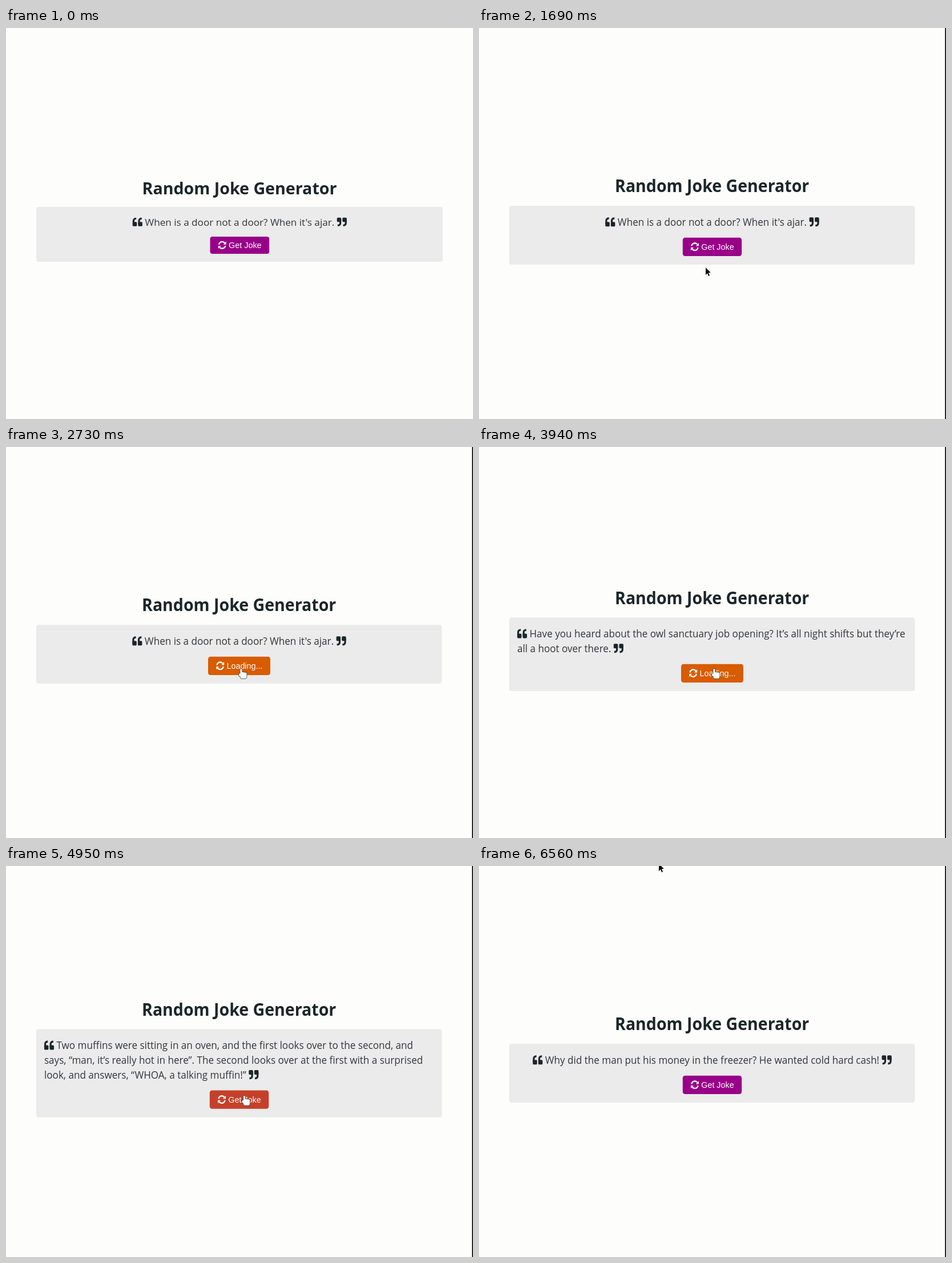
Animation of 818 by 684 pixels, one loop 6650 ms. Source, as an HTML page with a canvas:

```html
<!DOCTYPE html>
<html lang="en">
<head>
<meta charset="utf-8">
<title>Random Joke Generator</title>
<style>
  html, body { margin: 0; width: 100%; height: 100%; overflow: hidden; background: #000; }
  canvas { display: block; }
</style>
</head>
<body>
<canvas id="stage" width="818" height="684"></canvas>
<script>
const ctx = document.getElementById('stage').getContext('2d');
const LOOP = 6650, W = 818, H = 684, CENTER = 409.3;
const ZOOM_X = 0.998, ZOOM_Y = 1.073, ZOOM_TOP = -24.8;
const LINE = 24, BUTTON_TOP = 365, BUTTON_HEIGHT = 30;
const FADE = 200, STEP = 10, POINTER_LAG = 20;
const TITLE_FONT = '700 28.6px "Open Sans", sans-serif';
const JOKE_FONT = '17.12px "Open Sans", sans-serif';
const BUTTON_FONT = '14.4px "Liberation Sans", Arial, sans-serif';
const PURPLE = [153, 0, 136], ORANGE = [216, 92, 0];
const INK = '#1b2628';

// Each joke appears at `start`, after a click that shows the loading label.
const jokes = [
  { click: 0, start: 0, lines: ["When is a door not a door? When it's ajar."] },
  { click: 2730, start: 3110, lines: [
    'Have you heard about the owl sanctuary job opening? It’s all night shifts but they’re',
    'all a hoot over there.'] },
  { click: 3940, start: 4270, lines: [
    'Two muffins were sitting in an oven, and the first looks over to the second, and',
    'says, “man, it’s really hot in here”. The second looks over at the first with a surprised',
    'look, and answers, “WHOA, a talking muffin!”'] },
  { click: 5340, start: 5650, lines: [
    'Why did the man put his money in the freezer? He wanted cold hard cash!'] },
];

// The pointer rests between these moves.
const entry = { start: 480, x: 722, y: 389 };
const moves = [
  { start: 480, end: 790, x: 578, y: 165 },
  { start: 960, end: 1590, x: 397, y: 419 },
  { start: 1690, end: 2340, x: 412, y: 388 },
  { start: 4710, end: 5000, x: 418, y: 403 },
  { start: 5650, end: 6100, x: 335, y: 87 },
  { start: 6330, end: 6560, x: 315, y: -4 },
];

const clamp = v => Math.max(0, Math.min(1, v));
const mix = (a, b, k) => a + (b - a) * k;
const smooth = k => k * k * (3 - 2 * k);
const jokeAt = t => jokes.findLast(joke => t >= joke.start);
const extraHeight = t => (jokeAt(t).lines.length - 1) * LINE / 2;

function pointerAt(t) {
  let { x, y } = entry;
  for (const move of moves) {
    const k = smooth(clamp((t - move.start) / (move.end - move.start)));
    x = mix(x, move.x, k);
    y = mix(y, move.y, k);
  }
  return { x, y };
}

function overButton(t) {
  const { x, y } = pointerAt(t);
  const pageY = (y - ZOOM_TOP) / ZOOM_Y - BUTTON_TOP - extraHeight(t);
  return Math.abs(x / ZOOM_X - CENTER) < 52 && pageY > 0 && pageY < BUTTON_HEIGHT;
}

// Replays the fade up to time t, so the colour depends on the time alone.
function hoverAmount(t) {
  let amount = 0;
  for (let time = entry.start; time < t; time += STEP) {
    amount = clamp(amount + (overButton(time) ? STEP : -STEP) / FADE);
  }
  return amount;
}

function place(x, y, scale, draw) {
  ctx.save();
  ctx.translate(x, y);
  ctx.scale(scale, scale);
  draw();
  ctx.restore();
}

// Icons are drawn on a 512 unit grid.
function halfTurn() {
  ctx.translate(512, 512);
  ctx.rotate(Math.PI);
}

function quoteMark() {
  ctx.beginPath();
  ctx.roundRect(0, 256, 224, 224, 48);
  ctx.fill();
  ctx.lineWidth = 96;
  ctx.beginPath();
  ctx.moveTo(48, 370);
  ctx.arc(160, 192, 112, Math.PI, 1.5 * Math.PI);
  ctx.lineTo(190, 80);
  ctx.stroke();
}

function quoteIcon(x, baseline, closing) {
  place(x, baseline - 15, 17.12 / 512, () => {
    ctx.fillStyle = ctx.strokeStyle = INK;
    if (closing) halfTurn();
    quoteMark();
    ctx.translate(288, 0);
    quoteMark();
  });
}

function syncArrow() {
  ctx.lineWidth = 80;
  ctx.beginPath();
  ctx.arc(256, 256, 208, 1.06 * Math.PI, 1.77 * Math.PI);
  ctx.stroke();
  ctx.beginPath();
  ctx.moveTo(504, 36);
  ctx.lineTo(504, 216);
  ctx.lineTo(324, 216);
  ctx.fill();
}

function syncIcon(x, y) {
  place(x, y, 14.4 / 512, () => {
    syncArrow();
    halfTurn();
    syncArrow();
  });
}

function roundRect(x, y, w, h, color) {
  ctx.fillStyle = color;
  ctx.beginPath();
  ctx.roundRect(x, y, w, h, 4);
  ctx.fill();
}

function drawJoke(lines, firstBaseline) {
  ctx.font = JOKE_FONT;
  const widthOf = text => ctx.measureText(text).width;
  const space = widthOf(' '), indent = 17.12 + space;
  const left = lines.length > 1 ? 67.1 : CENTER - widthOf(lines[0]) / 2 - indent;
  quoteIcon(left, firstBaseline, false);
  ctx.fillStyle = '#333537';
  lines.forEach((line, i) => {
    const x = i ? left : left + indent, baseline = firstBaseline + i * LINE;
    ctx.fillText(line, x, baseline);
    if (i === lines.length - 1) quoteIcon(x + widthOf(line) + space, baseline, true);
  });
}

function drawButton(t, top) {
  const loading = jokes.some(joke => t >= joke.click && t < joke.start);
  const label = loading ? 'Loading...' : 'Get Joke';
  const hover = hoverAmount(t);
  const color = PURPLE.map((c, i) => Math.round(mix(c, ORANGE[i], hover)));
  ctx.font = BUTTON_FONT;
  const width = ctx.measureText(label).width + 46;
  const left = CENTER - width / 2;
  roundRect(left, top, width, BUTTON_HEIGHT, `rgb(${color})`);
  ctx.fillStyle = ctx.strokeStyle = '#fdfdfd';
  syncIcon(left + 14, top + 7.6);
  ctx.fillText(label, left + 32.5, top + 20);
}

function drawPage(t) {
  const extra = extraHeight(t);
  const zoom = clamp((t - 60) / 190);
  ctx.save();
  ctx.translate(0, mix(0, ZOOM_TOP, zoom));
  ctx.scale(mix(1, ZOOM_X, zoom), mix(1, ZOOM_Y, zoom));
  ctx.fillStyle = '#fdfdfc';
  ctx.fillRect(0, 0, W, H);
  ctx.fillStyle = INK;
  ctx.font = TITLE_FONT;
  ctx.textAlign = 'center';
  ctx.fillText('Random Joke Generator', CENTER - 0.3, 291 - extra);
  ctx.textAlign = 'left';
  roundRect(53, 313 - extra, 712, 96 + 2 * extra, '#ebebec');
  drawJoke(jokeAt(t).lines, 345.8 - extra);
  drawButton(t, BUTTON_TOP + extra);
  ctx.restore();
}

function drawHand() {
  ctx.beginPath();
  for (let finger = 0; finger < 4; finger++) {
    ctx.roundRect(finger * 2.7 - 1.6, finger ? 5 + finger * 0.5 : 0, 3, 9, 1.5);
  }
  ctx.roundRect(-1.6, 8, 11, 9, 3);
  ctx.roundRect(-4, 8, 4, 5, 2);
  ctx.strokeStyle = '#444';
  ctx.lineWidth = 1.6;
  ctx.stroke();
  ctx.fillStyle = '#fff';
  ctx.fill();
}

function drawArrow() {
  const outline = new Path2D('M0 0V13L3 10 5 15 7 14 5 9H9z');
  ctx.strokeStyle = '#fff';
  ctx.lineWidth = 1.4;
  ctx.stroke(outline);
  ctx.fillStyle = '#080808';
  ctx.fill(outline);
}

function drawPointer(t) {
  if (t < entry.start) return;
  const { x, y } = pointerAt(t);
  place(x, y, 1, overButton(t - POINTER_LAG) ? drawHand : drawArrow);
}

function frame() {
  const t = performance.now() % LOOP;
  ctx.fillStyle = '#000';
  ctx.fillRect(0, 0, W, H);
  drawPage(t);
  drawPointer(t);
  requestAnimationFrame(frame);
}
frame();
</script>
</body>
</html>
```
